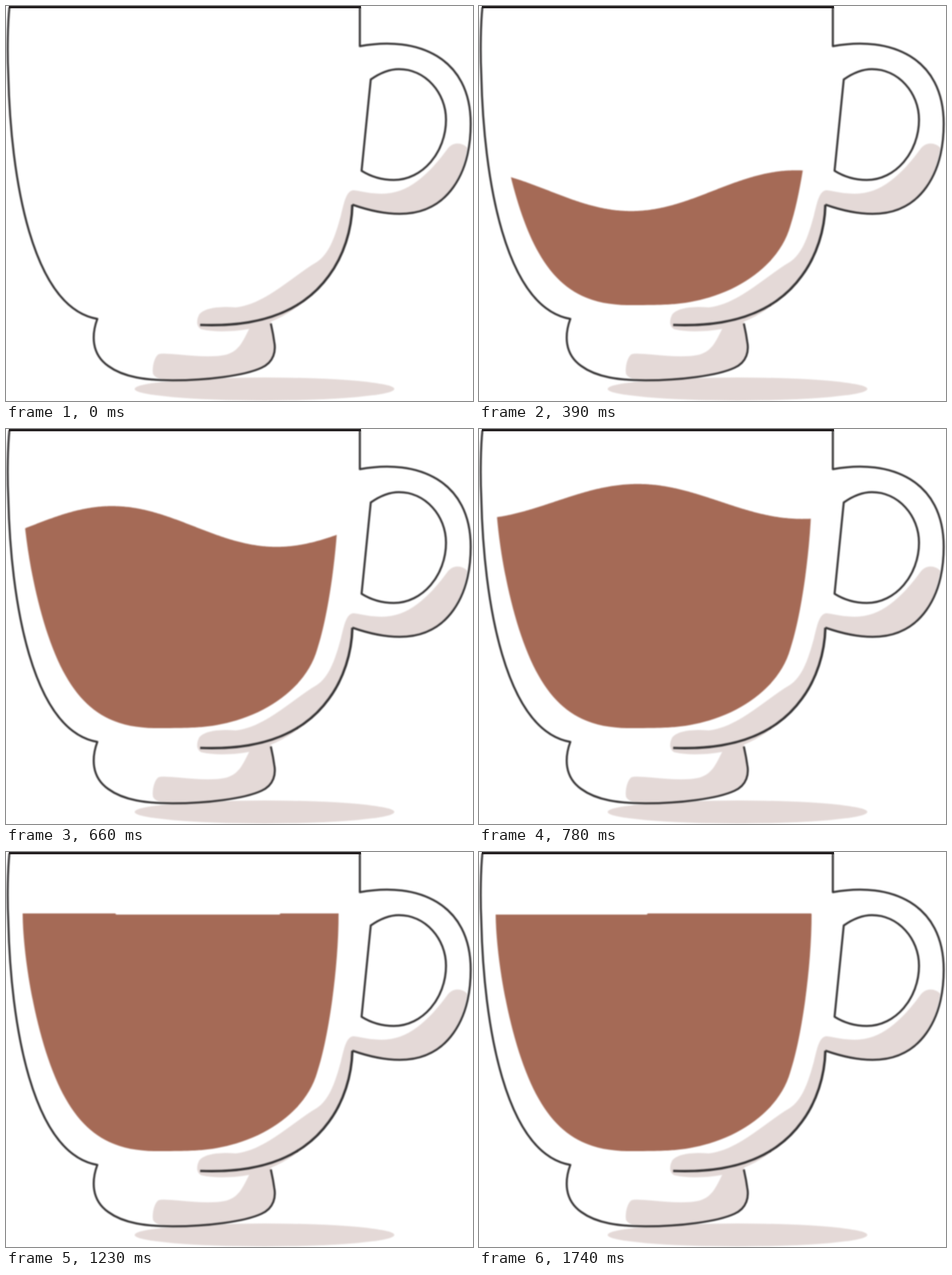
Write an HTML page that moves like this. It is 813x688 px and loops after 1770 ms.

```html
<!DOCTYPE html>
<html lang="en">
<head>
<meta charset="utf-8">
<title>Filling cup</title>
<style>
  html, body { margin: 0; width: 100%; height: 100%; overflow: hidden; background: #fff; }
  svg { display: block; width: 813px; height: 688px; }
  .shade { fill: #e4d9d7; }
  .line { fill: none; stroke: #333132; stroke-width: 3.5; stroke-linejoin: round; }
  .soft { filter: url(#soften); }
  .bold { stroke-width: 4.2; }
  .rim { stroke: #231f20; stroke-width: 4.2; }
</style>
</head>
<body>
<svg viewBox="0 0 813 688">
  <filter id="soften" filterUnits="userSpaceOnUse" x="-10" y="-10" width="833" height="708" color-interpolation-filters="sRGB">
    <feGaussianBlur stdDeviation="0.9"/>
  </filter>
  <clipPath id="bowl">
    <path d="M29 90V108C30 195 57 348 104 430C141 495 190 521 262 521C310 521 330 520 342 519C440 510 522 455 542 383C562 322 579 200 579 108V90Z"/>
  </clipPath>

  <g class="shade soft">
    <ellipse cx="450" cy="667" rx="226" ry="20"/>
    <path d="M803 247C795 238 780 236 770 247C735 295 700 327 655 327C635 327 620 323 606 321C592 320 588 345 583 365C572 405 562 432 541 446C500 470 450 520 400 525C375 523 345 525 336 538C330 550 333 560 340 563C365 569 400 567 425 562C520 540 603 450 603 346C640 359 665 362 685 362C755 362 794 312 803 247Z"/>
    <path d="M461 550C463 562 465 570 467 585C470 600 467 620 445 630C415 644 350 652 290 652C270 652 260 648 256 641C254 630 258 612 265 607C270 604 285 606 300 607C330 610 360 612 380 608C405 603 412 585 424 561Z"/>
  </g>

  <g class="soft">
    <path id="liquid" fill="#a56a56" clip-path="url(#bowl)"/>
  </g>

  <g class="line soft">
    <path d="M6 2C3 30 2 80 4 120C8 300 45 525 159 545C149 572 148 606 178 627C205 647 245 652 290 652C350 652 415 644 445 630C467 620 470 600 467 585C465 570 463 562 461 553"/>
    <path d="M603 346C640 359 665 362 685 362C770 362 809 290 809 205C809 90 717 51 616 70V2"/>
    <path d="M635 128C655 114 672 110 684 110C730 110 766 151 766 198C766 255 725 303 675 303C655 303 635 297 619 287Z"/>
    <path class="bold" d="M338 555.5C450 560 520 528 562 470C588 435 602 390 603 346"/>
  </g>
  <path class="line rim" d="M5 2H618"/>
</svg>

<script>
const LOOP = 1770, STEP = 30;
const WAVE = 573, SPEED = 0.764;
const REST = 108, FULL_AT = 880, CALM_AT = 900;
const liquid = document.getElementById('liquid');

// Steady rise first, then slowing down to the resting level.
function level(t) {
  if (t <= 270) return 405 + 0.69 * (270 - t);
  return REST + (0.065 * Math.max(0, FULL_AT - t)) ** 1.55;
}

function swell(t) {
  return 35.5 * Math.min(1, Math.max(0, (CALM_AT - t) / 140));
}

function surface(t) {
  const crest = 184.6 + SPEED * (t - 660);
  const mid = level(t), amp = swell(t), calm = t >= CALM_AT;
  return x => {
    const c = Math.cos((x - crest) / WAVE * 2 * Math.PI);
    return calm ? REST - Math.sign(c) * 1.1 : mid - amp * c;
  };
}

function draw(t) {
  const y = surface(t);
  let d = 'M20 540';
  for (let x = 20; x <= 590; x += 2) d += `L${x} ${y(x).toFixed(2)}`;
  liquid.setAttribute('d', d + 'L590 540Z');
}

const start = performance.now();
function tick() {
  const t = (performance.now() - start) % LOOP;
  draw(Math.floor(t / STEP) * STEP);
  requestAnimationFrame(tick);
}
tick();
</script>
</body>
</html>
```
